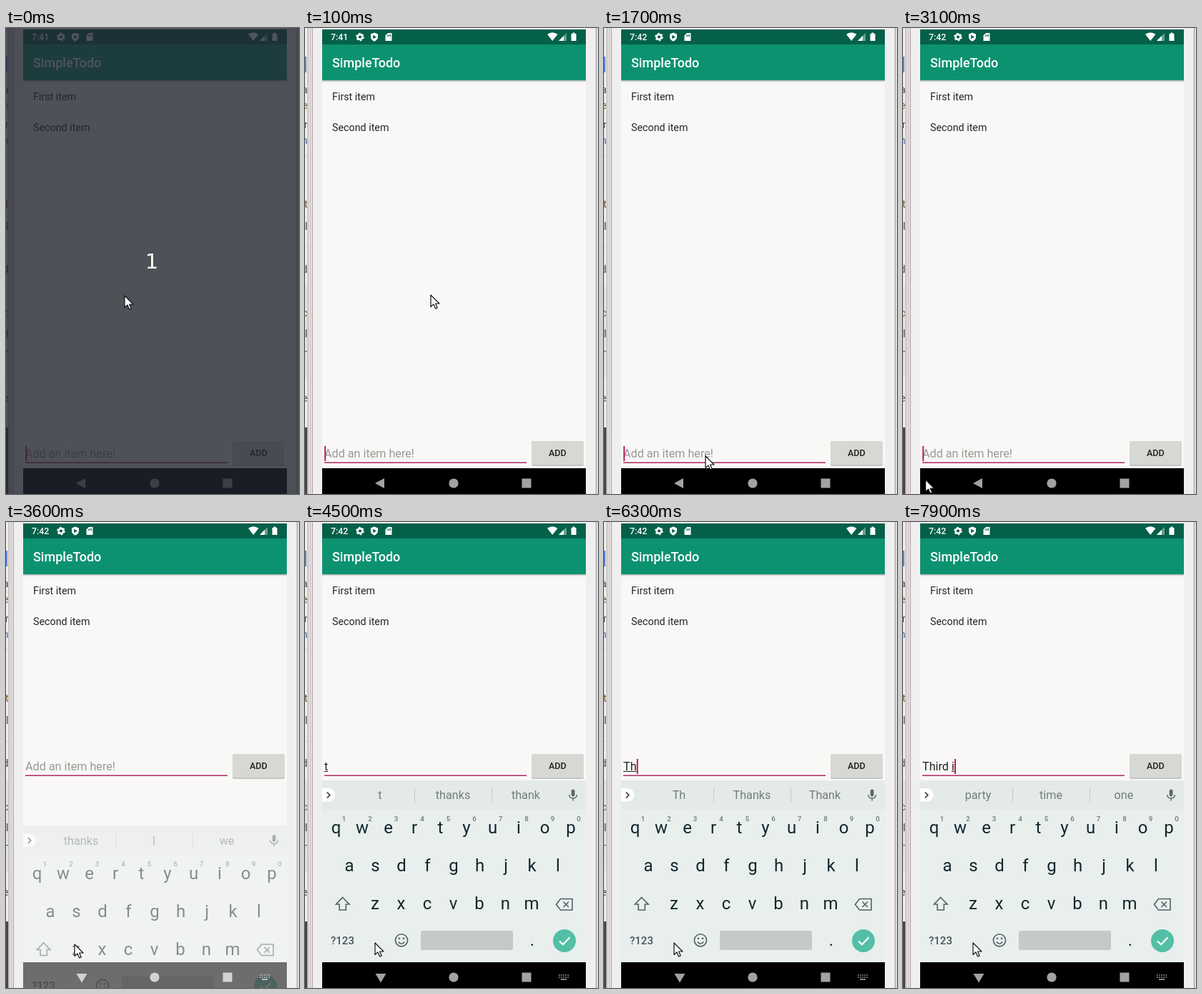
These frames come from a looping animation (410x651 px, 8000 ms). An HTML page:

```html
<!DOCTYPE html>
<html lang="en">
<head>
<meta charset="utf-8">
<title>Todo list</title>
<style>
html, body { margin: 0; width: 100%; height: 100%; overflow: hidden; background: #f0efef; }
svg { display: block; width: 410px; height: 651px; }
text { font-family: Roboto, sans-serif; white-space: pre; }
.mid { text-anchor: middle; }
.medium { font-weight: 500; }
</style>
</head>
<body>
<svg viewBox="0 0 410 651" xmlns="http://www.w3.org/2000/svg">
  <defs>
    <clipPath id="screenClip"><rect x="24" y="2" width="369" height="649"/></clipPath>
    <clipPath id="edgeClip"><rect width="3.5" height="651"/></clipPath>
    <linearGradient id="shade" x2="0" y2="1">
      <stop stop-color="#9fa9a6"/><stop offset="1" stop-color="#f9f8f6" stop-opacity="0"/>
    </linearGradient>
  </defs>

  <rect width="410" height="651" fill="#f0efef"/>
  <g id="edge" clip-path="url(#edgeClip)" font-size="14">
    <rect width="4" height="651" fill="#eeeeee"/>
    <rect y="40" width="2" height="22" fill="#5b8bd8"/>
    <path d="M0 178H4M0 307H4M0 487H4" stroke="#cfcfcf"/>
    <rect y="360" width="4" height="127" fill="#e4e3e3"/>
    <rect y="558" width="4" height="93" fill="#47454a"/>
  </g>
  <rect x="3.5" width="7" height="651" fill="#e3dddd"/>
  <path d="M4 0V651M10.5 0V651" stroke="#b3a7a9"/>
  <path d="M7.5 0V651" stroke="#cdc4c5"/>
  <path d="M407.5 0V651" stroke="#a9a5a6" stroke-width="1.5"/>
  <rect x="408.3" width="2" height="651" fill="#dedcdc"/>

  <g clip-path="url(#screenClip)">
    <rect x="24" y="2" width="369" height="649" fill="#f9f8f6"/>
    <rect x="24" y="73" width="369" height="4" fill="url(#shade)"/>
    <rect x="24" y="2" width="369" height="21" fill="#05604a"/>
    <rect x="24" y="23" width="369" height="50" fill="#0d9271"/>
    <g fill="#fff">
      <text id="clock" class="medium" x="36" y="17.3" font-size="12.4"></text>
      <circle cx="77" cy="12.5" r="3.4" fill="none" stroke="#fff" stroke-width="2.6"/>
      <circle cx="77" cy="12.5" r="5" fill="none" stroke="#fff" stroke-width="1.6" stroke-dasharray="2.6 2.636"/>
      <path d="M97 6.5L102 8.5V12.5Q102 16.5 97 18.7Q92 16.5 92 12.5V8.5Z"/>
      <path d="M95.2 9.8L100 12.5L95.2 15.2Z" fill="#05604a"/>
      <path d="M116 7H121.5V18H112.5V10.5Z"/>
      <path d="M115.5 9.5V12M117.5 9V12M119.5 9V12" stroke="#05604a"/>
      <path d="M339 8.8Q346 3.6 353.5 8.8L346.2 18Z"/>
      <path d="M366 7V18H355Z" opacity=".4"/>
      <path d="M362 11V18H355Z"/>
      <path d="M372.5 8H374.5V6.5H377.5V8H379.5V18H372.5Z"/>
      <text class="medium" x="38" y="55" font-size="18">SimpleTodo</text>
    </g>
    <g font-size="14.3" fill="#262626">
      <text x="38" y="100.5">First item</text>
      <text x="38" y="143.5">Second item</text>
    </g>

    <g id="form">
      <text id="entry" x="27" y="600" font-size="16.16"></text>
      <path id="composing" stroke="#222" fill="none"/>
      <rect x="27" y="606.4" width="283" height="1.6" fill="#b5346f"/>
      <rect id="caret" y="584" width="2" height="21" fill="#b81e63"/>
      <rect x="317" y="578.2" width="73" height="33.6" rx="2" fill="#b4b5b2"/>
      <rect x="317" y="577" width="73" height="33.5" rx="2" fill="#d6d8d4"/>
      <text class="mid medium" x="353.4" y="598" font-size="12.6" fill="#222">ADD</text>
    </g>

    <g id="keyboard">
      <rect x="24" y="361" width="369" height="300" fill="#e8efed"/>
      <rect x="24" y="361" width="369" height="41" fill="#e4eae8"/>
      <path d="M24 372H33A9.3 9.3 0 0 1 33 390.6H24Z" fill="#fff"/>
      <path d="M30.8 377.5L34.8 381.5L30.8 385.5" fill="none" stroke="#333" stroke-width="1.6"/>
      <path d="M153.5 371V392M261.5 371V392" stroke="#c3cac8"/>
      <g id="words" class="mid" font-size="16.2" fill="#737b7c"></g>
      <rect x="372.7" y="373.5" width="4.8" height="10" rx="2.4" fill="#5f686a"/>
      <path d="M369.7 381Q370 386 375.1 386Q380.2 386 380.5 381M375.1 386V389.5" fill="none" stroke="#5f686a" stroke-width="1.5"/>
      <g id="keys" class="mid" font-size="24" fill="#12262c"></g>
      <g fill="none" stroke="#536165" stroke-width="1.6">
        <path d="M52.7 524.5L62 534H57.3V542H48.1V534H43.4Z"/>
        <path d="M357.5 526.5H374V542H357.5L351.5 534.2Z"/>
        <path d="M361.5 530.5L369 538M369 530.5L361.5 538"/>
        <circle cx="135" cy="584.3" r="8.6"/>
        <path d="M130.6 586.5Q135 592 139.4 586.5"/>
      </g>
      <g fill="#536165"><circle cx="132" cy="581.7" r="1.3"/><circle cx="138" cy="581.7" r="1.3"/></g>
      <text class="mid medium" x="52.5" y="589.7" font-size="15" fill="#465458">?123</text>
      <rect x="162" y="571" width="129" height="27" rx="2.5" fill="#c5cac9"/>
      <circle cx="363" cy="585" r="16" fill="#53bfa7"/>
      <path d="M356 585.5L361 590.3L370.5 580.3" fill="none" stroke="#fff" stroke-width="2.2"/>
    </g>

    <rect id="navBar" x="24" y="615" width="369" height="36"/>
    <g id="navIcons">
      <path id="back"/>
      <circle cx="208" cy="636" r="6.6"/>
      <rect x="303.5" y="629.5" width="13" height="13"/>
      <g id="imeIcon">
        <path d="M355 633H369M355 636H369" stroke-width="1.6" stroke-dasharray="1.6 1.5"/>
        <path d="M358 639H366" stroke-width="1.6"/>
      </g>
    </g>
  </g>

  <g id="countdown">
    <rect width="410" height="651" fill="#22262f" opacity=".787"/>
    <text class="mid" x="204" y="336" font-size="29" fill="#fffff0" style="font-family:'DejaVu Sans',sans-serif">1</text>
  </g>
  <path id="pointer" d="M0 0V16.5L3.9 12.9L6.6 19L9.2 17.9L6.6 12H12Z" fill="#fff" stroke="#111" stroke-width="1.2" stroke-linejoin="round"/>
</svg>

<script>
const LOOP = 8000, STEP = 100;
const KEYBOARD_IN = 3500, SLIDE = 200, RISE = 254;
const $ = id => document.getElementById(id);

function addText(parent, content, x, y, attrs = {}) {
  const node = document.createElementNS('http://www.w3.org/2000/svg', 'text');
  node.textContent = content;
  for (const [key, value] of Object.entries({ x, y, ...attrs })) node.setAttribute(key, value);
  parent.append(node);
  return node;
}

// Page peeking out behind the phone window
[['a', 91], ['e', 113, '#6b5a1e'], ['r', 140], ['h', 162, '#3f64a8'], ['t', 251, '#6b5a1e'], ['l', 282],
 ['d', 342], ['c', 403, '#6b5a1e'], ['el', 432], ['T', 462, '#3f64a8'], ['e', 522]]
  .forEach(([s, y, fill = '#444']) => addText($('edge'), s, 3.5, y, { fill, 'text-anchor': 'end' }));

[['qwertyuiop', 43.5, 435], ['asdfghjkl', 62, 488], ['zxcvbnm', 98, 541]].forEach(([row, x, y]) =>
  [...row].forEach((letter, i) => addText($('keys'), letter, x + i * 36.5, y)));
[...'1234567890'].forEach((digit, i) =>
  addText($('keys'), digit, 54.5 + i * 36.5, 417.5, { 'font-size': 9.8, fill: '#6c777a', class: 'medium' }));
addText($('keys'), '.', 318, 592);
const words = [105, 207, 309].map(x => addText($('words'), '', x, 387.3));

const typing = [[0, ''], [3800, 't'], [4700, ''], [5000, 'T'], [5200, 'Th'], [5500, 'Thr'], [5700, 'Thri'],
  [5800, 'Thr'], [5900, 'Th'], [6000, 'T'], [6300, 'Th'], [6600, 'Thi'], [6700, 'Third'],
  [7200, 'Third '], [7800, 'Third i']];
const suggestions = {
  '': 'thanks I we', t: 't thanks thank', T: 'T Thanks The', Th: 'Th Thanks Thank',
  Thr: 'Thr Three Through', Thri: 'Thri Thrill Thrive', Thi: 'Thi This Think',
  Third: 'Third Thirds Thirty', 'Third ': 'party time one', 'Third i': 'party time one'
};
const pointerPath = [[0, 166, 374], [100, 176, 373], [200, 178, 385], [800, 138, 588], [900, 136, 592],
  [1500, 136, 592], [1700, 142, 598], [2000, 142, 598], [2200, 22, 641], [2800, 22, 641], [2900, 16, 641],
  [3000, 16, 641], [3500, 94, 592], [3600, 96, 590], [3700, 98, 588], [LOOP, 98, 588]];

function pointerAt(t) {
  const i = pointerPath.findIndex(p => p[0] > t);
  const [t0, x0, y0] = pointerPath[i - 1], [t1, x1, y1] = pointerPath[i];
  const p = (t - t0) / (t1 - t0);
  return [x0 + (x1 - x0) * p, y0 + (y1 - y0) * p];
}

function caretVisible(t, typedAt) {
  if (t < 3800) return Math.floor((t + 300) / 500) % 2 === (t < 200 ? 0 : 0);
  if (typedAt === 3800) return t < 4500;
  return !(t >= 7600 && t < 7800);
}

function drawEntry(t) {
  const [typedAt, value] = typing.filter(([at]) => at <= t).pop();
  const entry = $('entry');
  entry.textContent = value || 'Add an item here!';
  entry.setAttribute('fill', value ? '#222' : '#989896');
  const widthOf = n => n ? entry.getSubStringLength(0, n) : 0;
  const end = 27 + widthOf(value.length);
  const start = 27 + widthOf(value.lastIndexOf(' ') + 1);
  $('composing').setAttribute('d', end > start ? `M${start} 601.5H${end}` : '');
  $('caret').setAttribute('x', end + .2);
  $('caret').setAttribute('visibility', caretVisible(t, typedAt) ? 'visible' : 'hidden');
  suggestions[value].split(' ').forEach((word, i) => words[i].textContent = word);
}

function drawKeyboard(t) {
  const open = t >= KEYBOARD_IN;
  const p = Math.min(1, Math.max(0, (t - KEYBOARD_IN) / SLIDE));
  const sliding = open && p < 1;
  $('form').setAttribute('transform', `translate(0 ${open ? -253 : 0})`);
  $('keyboard').setAttribute('transform', `translate(0 ${RISE * (1 - p) ** 2})`);
  $('keyboard').setAttribute('opacity', p);
  $('navBar').setAttribute('opacity', sliding ? .55 : 1);
  const tone = sliding ? '#d2d2d2' : '#a2a2a2';
  $('navIcons').setAttribute('fill', tone);
  $('navIcons').setAttribute('stroke', 'none');
  $('imeIcon').setAttribute('stroke', tone);
  $('imeIcon').setAttribute('visibility', open ? 'visible' : 'hidden');
  $('back').setAttribute('d', open ? 'M98.5 631H113.5L106 643.5Z' : 'M111 629V643L98 636Z');
}

function draw(ms) {
  const t = Math.floor(ms / STEP) * STEP;
  $('clock').textContent = t < 500 ? '7:41' : '7:42';
  $('countdown').setAttribute('visibility', t < 100 ? 'visible' : 'hidden');
  $('pointer').setAttribute('transform', `translate(${pointerAt(t)})`);
  drawEntry(t);
  drawKeyboard(t);
}

const began = performance.now();
function tick() {
  draw((performance.now() - began) % LOOP);
  requestAnimationFrame(tick);
}
tick();
</script>
</body>
</html>
```
